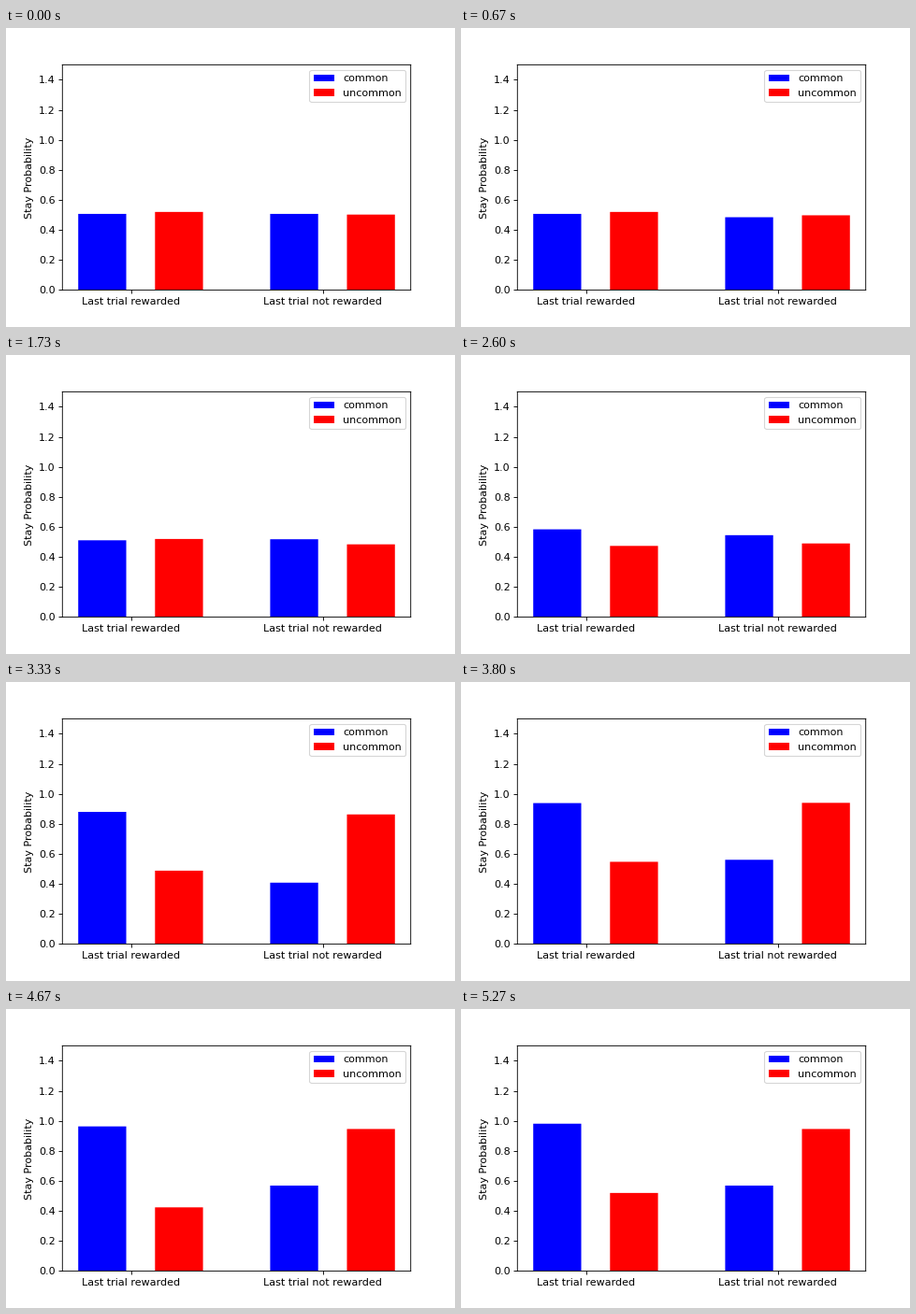
A matplotlib script for the animation above (5340 ms loop, 480 px wide and 320 px high).

```python
import numpy as np
import matplotlib.pyplot as plt
from matplotlib.animation import FuncAnimation

W, H, DPI = 480, 320, 80
LOOP_MS = 5340
TICK_MS = 20
STEPS = 80            # 15 steps per second
BAR_WIDTH = 0.25
BAR_GAP = 0.4

plt.rcParams["font.family"] = "DejaVu Sans"


def ease(step, mid, width):
    """Smooth change from 0 to 1 around the step mid."""
    return 1 / (1 + np.exp((mid - step) / width))


def rewarded_common(k):
    return 0.507 + 0.45 * ease(k, 44, 3.8) + 0.025 * ease(k, 72, 2)


def rewarded_uncommon(k):
    dip = 0.22 * ease(k, 67, 0.8) - 0.115 * ease(k, 71.5, 0.8)
    return 0.52 - 0.05 * ease(k, 34, 1.5) + 0.155 * ease(k, 56, 3) - dip


def unrewarded_common(k):
    early = 0.035 * ease(k, 18, 2) - 0.024 * ease(k, 7, 1)
    late = 0.17 * ease(k, 53, 1) - 0.148 * ease(k, 44, 1.3)
    return 0.507 + early + 0.029 * ease(k, 32, 1.5) + late


def unrewarded_uncommon(k):
    return 0.503 - 0.02 * ease(k, 14, 4) + 0.463 * ease(k, 46.8, 2.1)


def step_at(ms):
    step = min(int((ms + 5) * 3 / 200), STEPS - 1)
    # every sixth step repeats the one before it
    return step - 1 if step % 6 == 3 else step


fig, ax = plt.subplots(figsize=(W / DPI, H / DPI), dpi=DPI, facecolor="white")
fig.subplots_adjust(left=60.3 / W, right=432.7 / W,
                    bottom=1 - 280.4 / H, top=1 - 39.4 / H)

groups = np.arange(2)
common = ax.bar(groups, [.5, .5], BAR_WIDTH, color="blue", label="common")
uncommon = ax.bar(groups + BAR_GAP, [.5, .5], BAR_WIDTH, color="red",
                  label="uncommon")
ax.set_ylim(0, 1.5)
ax.set_yticks(np.arange(0, 1.5, 0.2))
ax.set_ylabel("Stay Probability")
ax.set_xticks(groups + 0.15)
ax.set_xticklabels(["Last trial rewarded", "Last trial not rewarded"])
ax.legend(loc="upper right")

# keep edges at their fractional pixel positions
for part in [*ax.spines.values(), *common, *uncommon]:
    part.set_snap(False)

bars = [(common[0], rewarded_common), (uncommon[0], rewarded_uncommon),
        (common[1], unrewarded_common), (uncommon[1], unrewarded_uncommon)]


def update(i):
    step = step_at(i * TICK_MS + TICK_MS / 2)
    for bar, height in bars:
        bar.set_height(height(step))
    return [bar for bar, _ in bars]


anim = FuncAnimation(fig, update, frames=LOOP_MS // TICK_MS, interval=TICK_MS,
                     init_func=lambda: update(0), repeat=True, repeat_delay=0)
plt.show()
```
